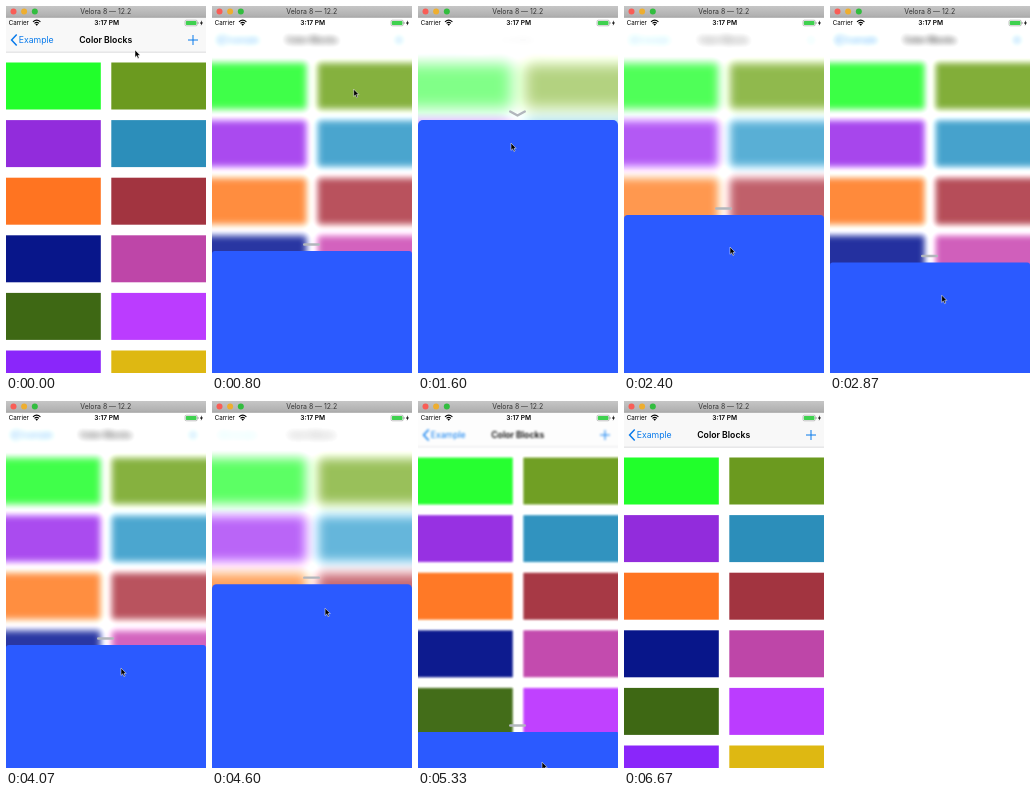
These frames come from a looping animation (200 by 367 pixels, 6990 ms). An HTML page:

```html
<!DOCTYPE html>
<html lang="en">
<head>
<meta charset="utf-8">
<title>Color Blocks</title>
<style>
html, body { margin: 0; width: 100%; height: 100%; overflow: hidden; background: #fff; }
svg { display: block; width: 100vw; height: 100vh; }
text { font-family: Inter, "Liberation Sans", sans-serif; }
.mid { text-anchor: middle; font-weight: 600; }
.line { fill: none; stroke: #087aeb; }
</style>
</head>
<body>
<svg viewBox="0 0 200 367">
  <defs>
    <linearGradient id="chrome" x2="0" y2="1">
      <stop stop-color="#c6c6c6"/><stop offset="1" stop-color="#adadad"/>
    </linearGradient>
  </defs>
  <g id="page">
    <rect x="-40" y="-40" width="280" height="450" fill="#fff"/>
    <g id="blocks"></g>
    <rect x="-40" y="-40" width="280" height="86" fill="#f8f8f8"/>
    <path d="M-40 46.2H240" stroke="#c6c6c8" stroke-width=".6"/>
    <path class="line" d="M10.7 28.6L5.6 34L10.7 39.4" stroke-width="1.5"/>
    <text x="12.7" y="37.2" font-size="8.7" fill="#087aeb">Example</text>
    <text class="mid" x="99.7" y="37.2" font-size="8.7">Color Blocks</text>
    <path class="line" d="M182 34H192M187 29V39" stroke-width="1"/>
  </g>
  <rect id="veil" width="200" height="367" fill="#fff"/>

  <rect width="200" height="11.5" fill="url(#chrome)"/>
  <path d="M0 11.3H200" stroke="#999" stroke-width=".6"/>
  <circle cx="7.5" cy="5.6" r="3" fill="#f95d56"/>
  <circle cx="18.1" cy="5.6" r="3" fill="#eeae2f"/>
  <circle cx="28.8" cy="5.6" r="3" fill="#32bd3f"/>
  <text x="99.7" y="8.2" font-size="6.9" fill="#333" text-anchor="middle">Velora 8 — 12.2</text>

  <text x="2.7" y="19.2" font-size="6.2">Carrier</text>
  <path d="M27 15.8Q30.7 12.5 34.4 15.8M28.5 17.4Q30.7 15.4 32.9 17.4" fill="none" stroke="#000" stroke-width="1.1"/>
  <path d="M29.4 18.4Q30.7 17.3 32 18.4L30.7 19.8Z"/>
  <text class="mid" x="100.7" y="19.3" font-size="6.6">3:17 PM</text>
  <rect x="179" y="14.2" width="12.3" height="5.6" rx="1.3" fill="#fff" stroke="#888" stroke-width=".5"/>
  <rect x="179.8" y="15" width="10.7" height="4" rx=".7" fill="#3fd14f"/>
  <path d="M192.1 16V18" stroke="#888" stroke-width=".7"/>
  <path d="M196 14.2L193.9 17.4H195.3L194.8 19.8L197 16.5H195.6Z"/>

  <path id="handle" fill="none" stroke="#b2b7bd" stroke-width="2.4" stroke-linecap="round" stroke-linejoin="round"/>
  <rect id="sheet" width="200" height="380" fill="#2b5aff"/>
  <path id="cursor" d="M0 0V7.4L1.7 5.8L2.9 8.5L4.1 8L3 5.3H5.2Z" stroke="#fff" stroke-width=".5"/>
</svg>
<script>
const LOOP = 6990, STEP = 200 / 3, BOTTOM = 367, OPEN = 114;
const $ = id => document.getElementById(id);

const colors = ['#21ff2b', '#6b9a1f', '#922cdc', '#2c8eba', '#ff7421', '#a23440',
  '#08168a', '#be46a8', '#3e6814', '#bb3cff', '#8a26fa', '#deb812'];
// Blocks run past the side edges so that the blur does not fade there.
$('blocks').innerHTML = colors.map((c, i) =>
  `<rect x="${i % 2 ? 105.3 : -40}" y="${56.5 + 57.6 * (i >> 1)}" width="134.8" height="47" fill="${c}"/>`).join('');

const linear = u => u;
const easeOut = u => 1 - (1 - u) ** 3;
const easeInOut = u => u * u * (3 - 2 * u);

// Poses: pointer position, sheet top, and the easing that leads there
const pose = (time, x, y, top, ease = linear) => ({ time, x, y, top, ease });
const poses = [
  pose(70, 129, 44, BOTTOM),
  pose(470, 187, 33, BOTTOM, easeInOut),
  pose(670, 187, 33, BOTTOM),
  pose(1330, 93, 137, OPEN, easeOut),
  pose(1600, 93, 137, OPEN),
  pose(2400, 106, 241, 209),
  pose(3467, 119, 351, 317.5),
  pose(4067, 115, 267, 244),
  pose(4560, 113, 206, 182, easeOut),
  pose(5333, 124, 361, 331, easeInOut),
  pose(5860, 126, 395, 348, easeOut),
  pose(6470, 126, 395, BOTTOM, easeInOut)
];

function poseAt(t) {
  const next = poses.findIndex(p => p.time > t);
  if (next < 1) return poses.at(next);
  const a = poses[next - 1], b = poses[next];
  const u = b.ease((t - a.time) / (b.time - a.time));
  const mix = key => a[key] + (b[key] - a[key]) * u;
  return { x: mix('x'), y: mix('y'), top: mix('top') };
}

function draw(now) {
  const t = Math.floor((now % LOOP + 4) / STEP) * STEP;
  const { x, y, top } = poseAt(t);
  const open = (BOTTOM - top) / (BOTTOM - OPEN);
  const bend = 2 * Math.max(0, (open - .85) / .15);
  const grip = top - 6.5;

  $('page').style.filter = open > 0 ? `blur(${7.8 * open}px) brightness(${1 + .15 * open})` : 'none';
  $('veil').setAttribute('opacity', .42 * open ** 1.6);
  $('sheet').setAttribute('y', top);
  $('sheet').setAttribute('rx', 5 * Math.min(1, open * 1.2));
  $('handle').setAttribute('d', `M92.2 ${grip - bend}L99.5 ${grip + bend}L106.8 ${grip - bend}`);
  $('handle').setAttribute('opacity', Math.min(1, open * 10));
  $('cursor').setAttribute('transform', `translate(${x} ${y})`);
}

const start = performance.now();
function tick() {
  // The first pose holds until the pointer starts to move.
  draw(performance.now() - start);
  requestAnimationFrame(tick);
}
tick();
</script>
</body>
</html>
```
